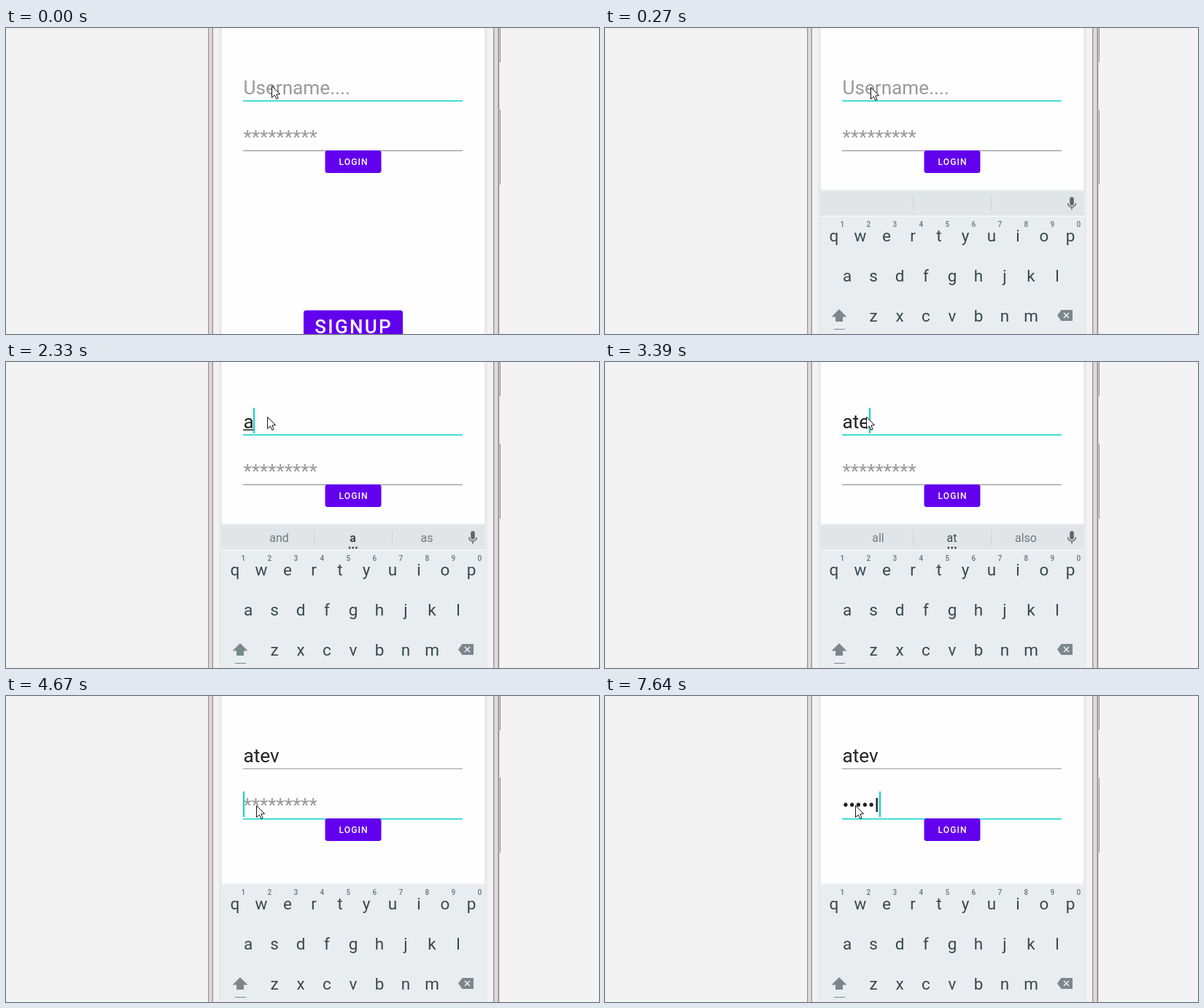
Animation of 813 by 420 pixels, one loop 8 s. Source, as an HTML page with a canvas:

```html
<!DOCTYPE html>
<html lang="en">
<head>
<meta charset="utf-8">
<title>Login form</title>
<style>
html, body { margin: 0; width: 100%; height: 100%; overflow: hidden; background: #f3f3f3; }
canvas { display: block; }
</style>
</head>
<body>
<canvas id="stage" width="813" height="420"></canvas>
<script>
const ctx = document.getElementById('stage').getContext('2d');
const LOOP = 8000;
const TEAL = '#0bd3c5', PURPLE = '#6200ee', INK = '#212121', HINT = '#999';
const FIELD = 26.2, LEFT = 325, TEXT_X = 325.4;

// Step tracks: [start time, value]
const mouseTrack = [
  [0, [364, 79]], [120, [364, 81]], [550, [363, 81]], [860, [360, 80]],
  [980, [355, 84]], [1130, [358, 75]], [3690, [335, 112]], [3840, [167, 169]],
  [3965, [252, 168]], [4090, [315, 163]], [4240, [331, 140]], [4360, [343, 150]]
];
const nameTrack = [[0, ''], [1950, 'a'], [3240, 'at'], [3390, 'ate'], [3540, 'atev']];
const passTrack = [[0, ''], [5540, 'd'], [5970, 'da'], [6220, 'dan'],
  [7020, 'danw'], [7330, 'danwo'], [7640, 'danwol']];
const composeTrack = [[0, false], [2090, true], [3240, false], [3690, true], [4520, false]];
const nameCaret = [[0, false], [2090, true], [2860, false], [3240, true], [4090, false]];
const passCaret = [[0, false], [4520, true], [4980, false], [5540, true], [6750, false], [7020, true]];
const wordTrack = [[0, null], [2210, ['and', 'a', 'as']], [3390, ['all', 'at', 'also']],
  [3690, ['Atev', 'atev', 'Ateb']]];

function at(track, t) {
  let value = track[0][1];
  for (const [start, v] of track) if (t >= start) value = v;
  return value;
}

function rect(x, y, w, h, color) {
  ctx.fillStyle = color;
  ctx.fillRect(x, y, w, h);
}

function text(str, x, y, size, color, align = 'left', weight = 400, spacing = 0) {
  ctx.font = `${weight} ${size}px Roboto, sans-serif`;
  ctx.letterSpacing = spacing + 'px';
  ctx.textAlign = align;
  ctx.fillStyle = color;
  ctx.fillText(str, x, y);
}

function textWidth(str) {
  ctx.font = `400 ${FIELD}px Roboto, sans-serif`;
  ctx.letterSpacing = '0px';
  return ctx.measureText(str).width;
}

function path(points, x = 0, y = 0) {
  ctx.beginPath();
  points.forEach(([px, py]) => ctx.lineTo(x + px, y + py));
  ctx.closePath();
}

function dot(x, y, r, color) {
  ctx.fillStyle = color;
  ctx.beginPath();
  ctx.arc(x, y, r, 0, Math.PI * 2);
  ctx.fill();
}

function button(x, y, w, h) {
  ctx.fillStyle = PURPLE;
  ctx.beginPath();
  ctx.roundRect(x, y, w, h, 3.5);
  ctx.fill();
}

function caret(str, y) {
  rect(Math.round(LEFT + textWidth(str)), y, 2, 35, TEAL);
}

function drawPhone() {
  rect(0, 0, 813, 420, '#f3f3f3');
  for (const [y, h] of [[-5, 52], [112, 103]]) {
    rect(675, y, 3, h, '#c9c3c4');
    rect(677, y, 1, h, '#8f8a8b');
  }
  rect(277, 0, 400, 420, '#e2dadc');
  rect(277, 0, 1, 420, '#9b9596');
  rect(278, 0, 1, 420, '#cfc8c9');
  rect(282, 0, 1, 420, '#c3bcbd');
  rect(283, 0, 1, 420, '#9b9596');
  rect(284, 0, 384, 420, '#f2f2f3');
  rect(292, 0, 368, 420, '#e9eaeb');
  rect(668, 0, 1, 420, '#9b9596');
  rect(669, 0, 1, 420, '#c3bcbd');
  rect(674, 0, 1, 420, '#bdb6b7');
  rect(675, 0, 1, 420, '#8b8586');
  rect(676, 0, 1, 420, '#e4dfe0');
  rect(296, 0, 360, 420, '#fefefe');
}

function drawName(t) {
  const name = at(nameTrack, t);
  text(name || 'Username....', TEXT_X, 91, FIELD, name ? INK : HINT);
  if (at(composeTrack, t)) rect(LEFT, 92.5, textWidth(name), 1.5, INK);
  if (at(nameCaret, t)) caret(name, 63);
  if (t < 4520) rect(LEFT, 99.3, 301, 1.5, TEAL);
  else rect(LEFT, 99, 301, 1.5, '#b4b4b4');
}

function drawPassword(t) {
  const pass = at(passTrack, t);
  const shown = pass && '\u2022'.repeat(pass.length - 1) + pass.slice(-1);
  text(shown || '*********', TEXT_X, 159, FIELD, pass ? INK : HINT);
  if (at(passCaret, t)) caret(shown, 131);
  if (t < 4360) rect(LEFT, 168, 301, 1, '#888');
  else rect(LEFT, 168, 301, 1.5, TEAL);
}

function drawButtons() {
  button(437.5, 168, 77, 31);
  text('LOGIN', 456.6, 188, 12.1, '#fff', 'left', 500, 1.07);
  button(408, 387.5, 136, 50);
  text('SIGNUP', 423.2, 419, 26, '#fff', 'left', 500, 2.32);
}

function drawMic() {
  ctx.fillStyle = ctx.strokeStyle = '#5c686e';
  ctx.beginPath();
  ctx.roundRect(637.2, 232, 5.6, 11.5, 2.8);
  ctx.fill();
  ctx.lineWidth = 1.5;
  ctx.beginPath();
  ctx.arc(640, 240.5, 5.4, 0, Math.PI);
  ctx.moveTo(640, 246);
  ctx.lineTo(640, 249.5);
  ctx.stroke();
}

function drawStrip(t) {
  rect(296, 222, 360, 2, '#eceeef');
  rect(296, 224, 360, 34, '#e1e5e8');
  rect(422, 231, 1, 20, '#cdd3d6');
  rect(529, 231, 1, 20, '#cdd3d6');
  drawMic();
  const words = at(wordTrack, t);
  if (!words) return;
  const bold = t >= 2330 && t < 3390;
  text(words[0], 374.5, 247, 16, '#6e797f', 'center');
  text(words[1], 475.5, 247, 16, '#37474f', 'center', bold ? 700 : 400);
  text(words[2], 577, 247, 16, '#6e797f', 'center');
  for (let i = -1; i < 2; i++) dot(475.7 + i * 4.7, 255, 1.4, '#37474f');
}

function drawKeys() {
  rect(296, 257, 360, 1, '#eceeef');
  rect(296, 258, 360, 1, '#f7f9fa');
  rect(296, 259, 360, 161, '#e9edf0');
  const rows = [['qwertyuiop', 314, 293], ['asdfghjkl', 332, 348], ['zxcvbnm', 368, 403]];
  for (const [keys, x, y] of rows)
    [...keys].forEach((k, i) => text(k, x + i * 36, y, 22.5, '#37474f', 'center'));
  [...'1234567890'].forEach((d, i) => text(d, 325.3 + i * 36, 273, 10, '#66737a', 'center', 500));

  ctx.fillStyle = '#7b878d';
  path([[321, 386], [331.5, 396.5], [326, 396.5], [326, 403], [316, 403], [316, 396.5], [310.5, 396.5]]);
  ctx.fill();
  rect(314, 413, 15, 1, '#7b878d');

  path([[620, 394.5], [625.5, 387], [641, 387], [641, 402], [625.5, 402]]);
  ctx.fill();
  ctx.strokeStyle = '#e9edf0';
  ctx.lineWidth = 1.7;
  ctx.beginPath();
  ctx.moveTo(629, 391); ctx.lineTo(636, 398);
  ctx.moveTo(636, 391); ctx.lineTo(629, 398);
  ctx.stroke();
}

function drawKeyboard(t) {
  if (t < 120) return;
  ctx.save();
  ctx.translate(0, t < 270 ? 32 : 0);
  if (t < 4670) drawStrip(t);
  drawKeys();
  ctx.restore();
}

function drawMouse(t) {
  const [x, y] = at(mouseTrack, t);
  path([[0, 0], [0, 16], [3.8, 12.6], [6.4, 18], [8.6, 17], [6.4, 11.5], [11, 11.1]], x + 0.5, y + 0.5);
  ctx.fillStyle = '#fff';
  ctx.fill();
  ctx.strokeStyle = '#111';
  ctx.lineWidth = 1;
  ctx.stroke();
}

function draw(t) {
  drawPhone();
  drawName(t);
  drawPassword(t);
  drawButtons();
  drawKeyboard(t);
  drawMouse(t);
}

const start = performance.now();
function tick() {
  draw((performance.now() - start) % LOOP);
  requestAnimationFrame(tick);
}
tick();
</script>
</body>
</html>
```
